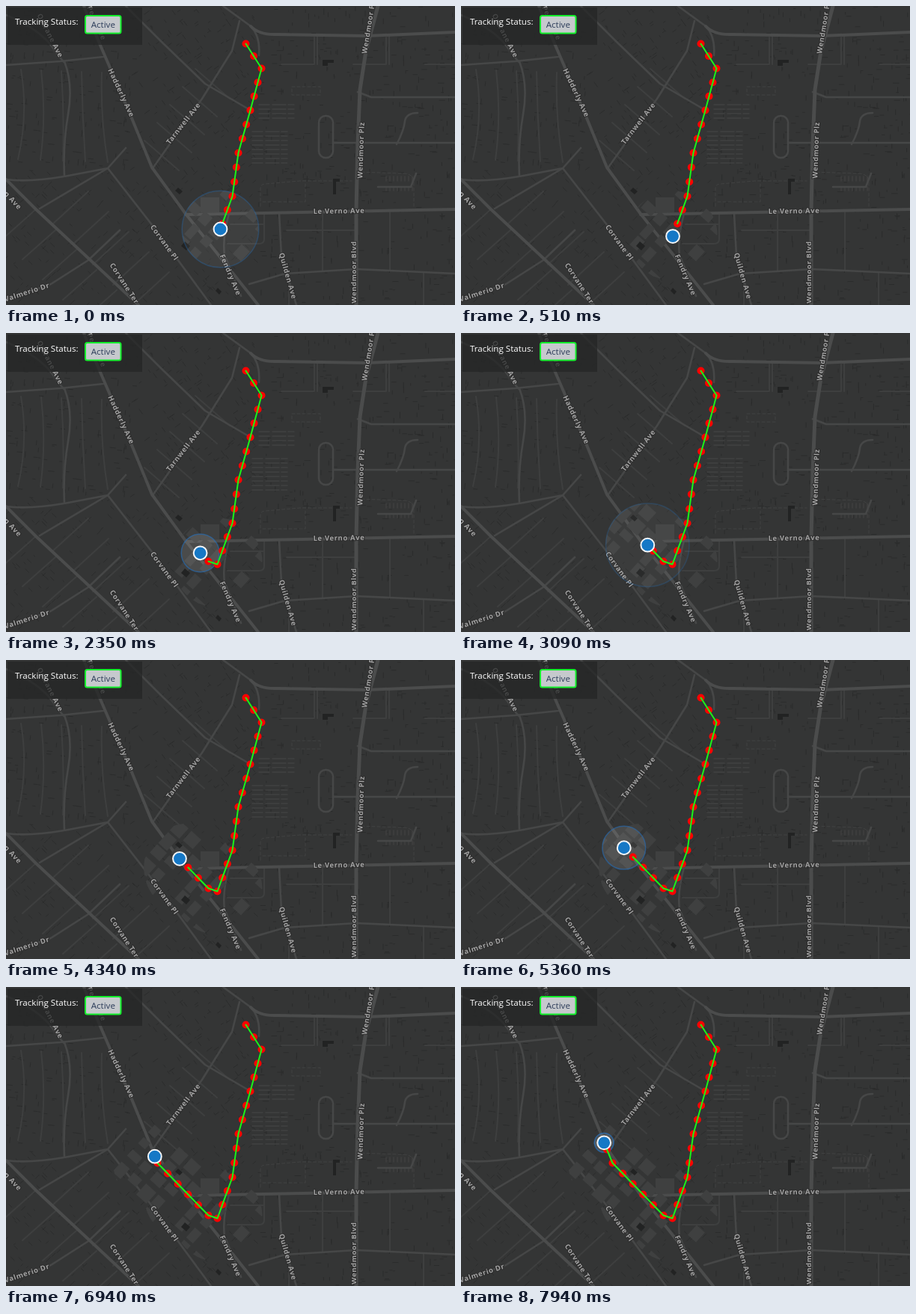
An HTML page for the animation above (7.99 s loop, 600 by 400 pixels).

```html
<!DOCTYPE html>
<html lang="en">
<head>
<meta charset="utf-8">
<title>Live tracking map</title>
<style>
  html, body { margin: 0; width: 100%; height: 100%; overflow: hidden; background: #343535; }
  svg { display: block; width: 100vw; height: 100vh; }
  .line { fill: none; stroke-linecap: round; stroke-linejoin: round; }
  #names text {
    font: 600 9.5px "Noto Sans", "Open Sans", sans-serif; letter-spacing: .6px; fill: #a4a4a4;
    stroke: #2c2c2c; stroke-width: 2px; paint-order: stroke; text-anchor: middle;
  }
  .ui { font: 11.6px "Open Sans", "Noto Sans", sans-serif; }
</style>
</head>
<body>
<svg viewBox="0 0 600 400">
  <defs><clipPath id="seen"></clipPath></defs>
  <rect width="600" height="400" fill="#343535"/>
  <g id="ground" class="line"></g>

  <g class="line" stroke="#414242" stroke-dasharray="4 3">
    <path d="M340 268V244Q340 238 347 238L392 234H462M400 238V262H340M468 222L530 224Q545 224 545 236V268"/>
    <path d="M382 108H420V119H382Z"/>
  </g>

  <g class="line" stroke="#464747" stroke-width="2.6">
    <path d="M0 12Q44 30 62 55T78 74Q90 105 83 145T78 227M0 79L72 74L130 68M0 232Q30 236 78 228L136 217L160 190"/>
    <path d="M160 0L210 50L266 104L326 139M196 217L262 124L302 60L312 20M290 0L327 27Q340 40 338 66"/>
    <path d="M45 271L136 217L196 294L274 400M0 393L60 372L110 340L152 300"/>
    <path d="M298 278Q289 310 292 333L314 388M365 277L368 334L388 400M325 372L373 358L468 352L600 358"/>
    <path d="M437 183H600M522 185Q532 166 533 154Q535 143 550 143M470 115L488 122H600M497 242H541L548 224"/>
    <rect x="418" y="147" width="19" height="56" rx="9"/>
  </g>

  <g class="line" stroke="#4b4c4c" stroke-width="4">
    <path d="M104 0L112 20L137 78L168 150L195 216L240 278L337 400"/>
    <path d="M0 232L40 272L177 400M240 279L345 277L600 272M327 27Q338 39 362 38L482 40L600 35"/>
    <path d="M497 0L481 60L473 112L470 185L468 274V400" stroke-width="5"/>
  </g>

  <g id="blocks" clip-path="url(#seen)" fill="#3f4040"></g>

  <g fill="#222323">
    <path d="M437 231H446V235H441V252H437ZM423 72H438V76H430V80H423Z"/>
    <path d="M230 243L236 248L232 252L226 247ZM239 315L246 321L241 327L234 321ZM283 377L288 382L285 386L280 381Z"/>
  </g>

  <g id="names"></g>

  <g transform="translate(.5 .5)">
    <circle id="halo" fill="#fff" stroke="#2471c0" stroke-width="1.5"/>
    <g id="dots" fill="#f00"></g>
    <polyline id="trail" class="line" stroke="#19f519" stroke-width="2"/>
    <circle id="marker" r="8.9" fill="#1678c6" stroke="#f4f6f8" stroke-width="2"/>
  </g>

  <rect x="2" y="2" width="180" height="50" fill="#242626" fill-opacity=".75"/>
  <text class="ui" x="12" y="25.4" fill="#fff">Tracking Status:</text>
  <rect x="106" y="13" width="47.5" height="23.5" rx="2.5" fill="#c6c9cd" stroke="#14f02c" stroke-width="2"/>
  <text class="ui" x="129.8" y="29.4" fill="#2b3b58" text-anchor="middle">Active</text>
</svg>

<script>
const LOOP = 7990, LEG = 979, START = 13.4;
const PULSE = { first: 11.9, every: 3, legs: 2, radius: 60 };

// Corners of the walk: x, y, evenly spaced fixes since the corner before
const corners = [[320, 50, 0], [341, 83, 2], [326, 139, 3], [310, 196, 3], [302, 254, 3],
  [282, 309, 3], [270, 305, 1], [202, 235, 5], [187, 199, 2]];

// Text, centre, angle
const labels = [
  ["Le Verno Ave", 445, 277.5, -1], ["Wendmoor Blvd", 468, 356, -90],
  ["Wendmoor Plz", 477.5, 193, -88], ["Wendmoor Plz", 488, 27, -81],
  ["Tarnwell Ave", 239.5, 159, -52], ["Hadderly Ave", 151, 117.5, 65],
  ["Corvane Pl", 209, 318.5, 54], ["Corvane Ter", 155.5, 373, 57],
  ["Fendry Ave", 297, 361, 67], ["Quilden Ave", 373.5, 362, 74],
  ["Valmerio Dr", 29, 386, -18], ["Ostrane Ave", 56, 41, 63],
  ["Penn Ave", 118, 24, 66], ["Tolden Ave", -3, 252, 47]
];

const $ = id => document.getElementById(id);

function set(el, attrs) {
  for (const key in attrs) el.setAttribute(key, attrs[key]);
  return el;
}

function add(parent, tag, attrs, text = "") {
  const el = set(document.createElementNS("http://www.w3.org/2000/svg", tag), attrs);
  el.textContent = text;
  return parent.appendChild(el);
}

const mix = (a, b, f) => a + (b - a) * f;

function randomFrom(seed) {
  return () => (seed = (seed * 16807) % 2147483647) / 2147483647;
}
const rnd = randomFrom(4177);

function stroke(d, color, width) {
  add($("ground"), "path", { d, stroke: color, "stroke-width": width });
}

// Building edges follow the street grid of each quarter
function drawTexture() {
  let edges = "";
  for (let i = 0; i < 1100; i++) {
    const x = rnd() * 600, y = rnd() * 400, len = 2 + rnd() * 6;
    const grid = x > 335 ? 0 : y > 220 ? 0.78 : x > 170 ? 0.95 : 0.1;
    const a = grid + (rnd() < 0.5 ? Math.PI / 2 : 0);
    edges += `M${x} ${y}l${Math.cos(a) * len} ${Math.sin(a) * len}`;
  }
  stroke(edges, "#2b2c2c", 1);

  let rows = "";
  for (let y = 132; y < 216; y += 6)
    if (y < 152 || y > 166) rows += `M${y < 152 ? 338 : 329} ${y}h14m4 0h18m3 0h8`;
  for (let x = 508; x < 545; x += 5) rows += `M${x} 228v6m0 8v5`;
  stroke(rows, "#404141", 1.4);
}

function drawSideStreets() {
  let d = "";
  for (let i = 0; i < 5; i++) {
    const k = i * 27;
    d += `M${62 + k} ${292 + k}l48 -44M${40 + k} ${272 + k}l-45 40`;
    d += `M${20 + k} ${85 + i}q${10 - i * 3} 60 ${-4 + i * 3} 120`;
    d += `M${185 + i * 17} ${180 - i * 24}l46 40`;
    d += `M${378 + i * 45} ${i % 2 ? 276 : 356}v${i % 2 ? 78 : 44}`;
    d += `M${368 + i * 48} ${i % 2 ? 38 : 78}h${i % 2 ? 0 : 44}v${i % 2 ? 40 : -36}`;
  }
  d += "M345 279V312Q345 318 338 318H296M300 292H345M375 300H468";
  stroke(d, "#3e3f3f", 2);
}

function drawBlocks() {
  const cell = 22;
  const grid = add($("blocks"), "g", { transform: "translate(240 270) rotate(42)" });
  for (let x = -110; x < 110; x += cell)
    for (let y = -80; y < 80; y += cell)
      if (rnd() < 0.6) add(grid, "rect", { x, y, width: cell * mix(0.5, 0.9, rnd()), height: cell * mix(0.5, 0.9, rnd()) });
  add($("blocks"), "rect", { x: 260, y: 256, width: 25, height: 20 });
}

const fixes = corners.flatMap(([x, y, steps], i) => {
  const [px, py] = corners[Math.max(i - 1, 0)];
  return i ? Array.from({ length: steps }, (_, k) =>
    [mix(px, x, (k + 1) / steps), mix(py, y, (k + 1) / steps)]) : [[x, y]];
});

function position(u) {
  const i = Math.min(Math.floor(u), fixes.length - 2);
  return [0, 1].map(axis => mix(fixes[i][axis], fixes[i + 1][axis], u - i));
}

drawTexture();
drawSideStreets();
drawBlocks();
for (const [text, x, y, angle] of labels)
  add($("names"), "text", { transform: `translate(${x} ${y}) rotate(${angle})` }, text);
const dots = fixes.map(([cx, cy]) => add($("dots"), "circle", { cx, cy, r: 5 }));
const seen = [0, 1, 2, 3].map(() => add($("seen"), "circle", {}));

function draw(t) {
  const u = START + t / LEG;
  const [cx, cy] = position(u);
  set($("marker"), { cx, cy });

  const count = Math.floor(u) + 1;
  dots.forEach((dot, i) => set(dot, { visibility: i < count ? "visible" : "hidden" }));
  set($("trail"), { points: fixes.slice(0, count).join(" ") });

  // Each pulse grows with the marker and leaves its buildings uncovered
  const halo = { cx, cy, r: 0, visibility: "hidden" };
  seen.forEach((circle, k) => {
    const begin = PULSE.first + k * PULSE.every;
    const p = Math.min(1, Math.max(0, (u - begin) / PULSE.legs));
    const r = PULSE.radius * (1 - Math.cos(Math.PI * p)) / 2;
    const [x, y] = position(Math.min(u, begin + PULSE.legs));
    set(circle, { cx: x, cy: y, r });
    if (p > 0 && p < 1) Object.assign(halo, {
      r, visibility: "visible",
      "fill-opacity": 0.2 * (1 - p),
      "stroke-opacity": 0.1 + 0.9 * (1 - p)
    });
  });
  set($("halo"), halo);
}

function tick() {
  draw(performance.now() % LOOP);
  requestAnimationFrame(tick);
}
tick();
</script>
</body>
</html>
```
